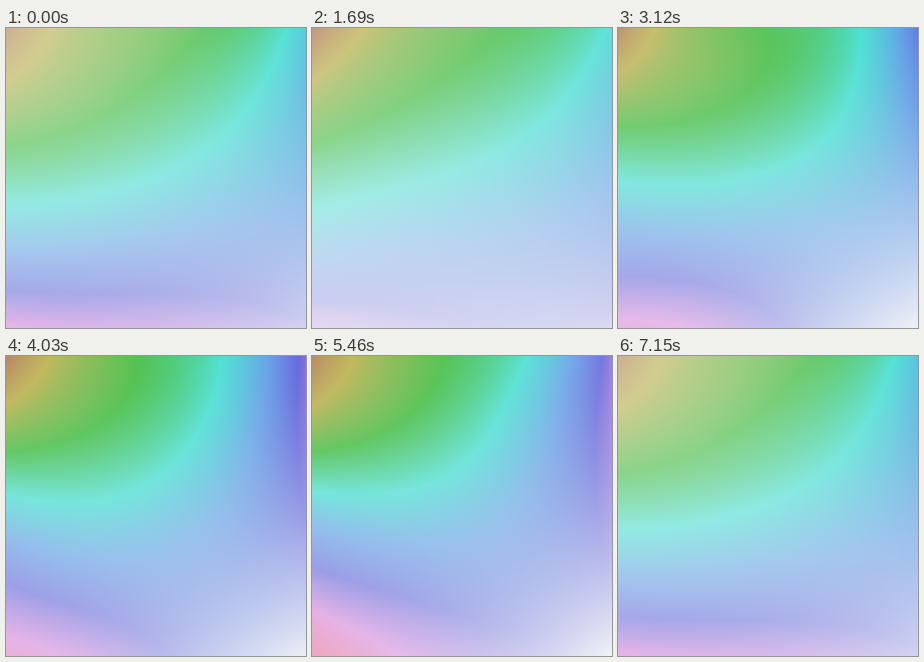
Write an HTML page with a canvas that moves like this. It is 300 px wide and 300 px high and loops after 7.28 s.

```html
<!DOCTYPE html>
<html lang="en">
<head>
<meta charset="utf-8">
<title>Drifting colours</title>
<style>
  html, body { margin: 0; width: 100%; height: 100%; overflow: hidden; }
  canvas { display: block; width: 100%; height: 100%; }
</style>
</head>
<body>
<canvas id="stage" width="300" height="300"></canvas>
<script>
const SIZE = 300, LOOP = 7280, STEP = 130;

// Brown, yellow, green, cyan, sky, periwinkle, lilac, rose
const PALETTE = [
  [190, 138, 116], [198, 190, 110], [108, 202, 108], [121, 230, 221],
  [146, 188, 236], [150, 152, 229], [226, 170, 229], [240, 150, 175]
];

// Each pose: palette positions on a 4 x 4 grid, then the whiteness
// of the corners (top left, top right, bottom left, bottom right).
const POSES = [
  { time: 0,
    hue: [0.2, 1.5, 2.0, 3.4,  1.7, 2.15, 2.8, 3.75,  3.5, 3.65, 3.95, 4.1,  6.1, 5.8, 5.6, 5.1],
    white: [0.25, -0.35, 0.15, 0.6] },
  { time: 1690,
    hue: [0, 1.5, 2.05, 3.1,  1.75, 2.3, 2.85, 3.7,  3.35, 3.65, 3.9, 4.25,  5.8, 5.3, 4.9, 5.2],
    white: [0.1, -0.2, 0.62, 0.68] },
  { time: 3120,
    hue: [0.15, 1.75, 2.4, 4.6,  2.0, 2.2, 2.85, 4.15,  3.95, 3.85, 3.9, 4.1,  6.2, 5.7, 4.7, 4.6],
    white: [0, -0.5, 0.2, 0.92] },
  { time: 4030,
    hue: [0.1, 1.7, 2.75, 5.3,  2.1, 2.4, 3.3, 5.2,  4.4, 3.95, 4.2, 4.9,  6.3, 5.6, 4.7, 4.8],
    white: [-0.1, -0.5, 0.15, 0.9] },
  { time: 5460,
    hue: [0.2, 1.7, 2.75, 5.4,  2.1, 2.5, 3.5, 5.4,  4.7, 4.2, 4.35, 5.1,  6.9, 5.9, 5.2, 5.0],
    white: [-0.1, -0.35, 0.15, 0.95] },
  { time: 6500,
    hue: [0.3, 1.6, 2.4, 4.5,  1.9, 2.25, 2.95, 4.3,  4.1, 3.95, 4.05, 4.6,  6.3, 5.9, 5.4, 5.0],
    white: [0.1, -0.45, 0.15, 0.85] }
];

const mix = (a, b, t) => a + (b - a) * t;

// Weights of the cubic through four evenly spaced points
const cubicWeights = s => [
  (s - 1) * (s - 2) * (s - 3) / -6,
  s * (s - 2) * (s - 3) / 2,
  s * (s - 1) * (s - 3) / -2,
  s * (s - 1) * (s - 2) / 6
];
const weights = Array.from({ length: SIZE }, (_, i) => cubicWeights(3 * (i + 0.5) / SIZE));

function poseAt(index) {
  const n = POSES.length, lap = Math.floor(index / n), pose = POSES[index - lap * n];
  return { time: pose.time + lap * LOOP, values: [...pose.hue, ...pose.white] };
}

// Smooth periodic interpolation between unevenly timed poses
function valuesAt(time) {
  const i = POSES.findLastIndex(pose => pose.time <= time);
  const [a, b, c, d] = [i - 1, i, i + 1, i + 2].map(poseAt);
  const span = c.time - b.time, t = (time - b.time) / span;
  const ease = t * t * (3 - 2 * t);
  return b.values.map((from, k) => {
    const to = c.values[k];
    const slopeIn = (to - a.values[k]) / (c.time - a.time) * span;
    const slopeOut = (d.values[k] - from) / (d.time - b.time) * span;
    return mix(from, to, ease) + t * (1 - t) * ((1 - t) * slopeIn - t * slopeOut);
  });
}

const context = document.getElementById("stage").getContext("2d");
const image = context.createImageData(SIZE, SIZE);

function draw(time) {
  const values = valuesAt(time);
  const [topLeft, topRight, bottomLeft, bottomRight] = values.slice(16);
  let offset = 0;
  for (let y = 0; y < SIZE; y++) {
    const wy = weights[y], down = (y / SIZE) ** 1.5;
    const column = [0, 1, 2, 3].map(k =>
      wy[0] * values[k] + wy[1] * values[k + 4] + wy[2] * values[k + 8] + wy[3] * values[k + 12]);
    const left = mix(topLeft, bottomLeft, down), right = mix(topRight, bottomRight, down);
    for (let x = 0; x < SIZE; x++) {
      const wx = weights[x];
      const hue = wx[0] * column[0] + wx[1] * column[1] + wx[2] * column[2] + wx[3] * column[3];
      const position = Math.min(6.999, Math.max(0, hue));
      const index = Math.floor(position), part = position - index;
      const white = mix(left, right, (x / SIZE) ** 2);
      for (let channel = 0; channel < 3; channel++) {
        const tone = mix(PALETTE[index][channel], PALETTE[index + 1][channel], part);
        image.data[offset++] = mix(tone, 248, white);
      }
      image.data[offset++] = 255;
    }
  }
  context.putImageData(image, 0, 0);
}

let shown = -1;
function tick() {
  const time = Math.floor(performance.now() % LOOP / STEP) * STEP;
  if (time !== shown) draw(shown = time);
  requestAnimationFrame(tick);
}
tick();
</script>
</body>
</html>
```
